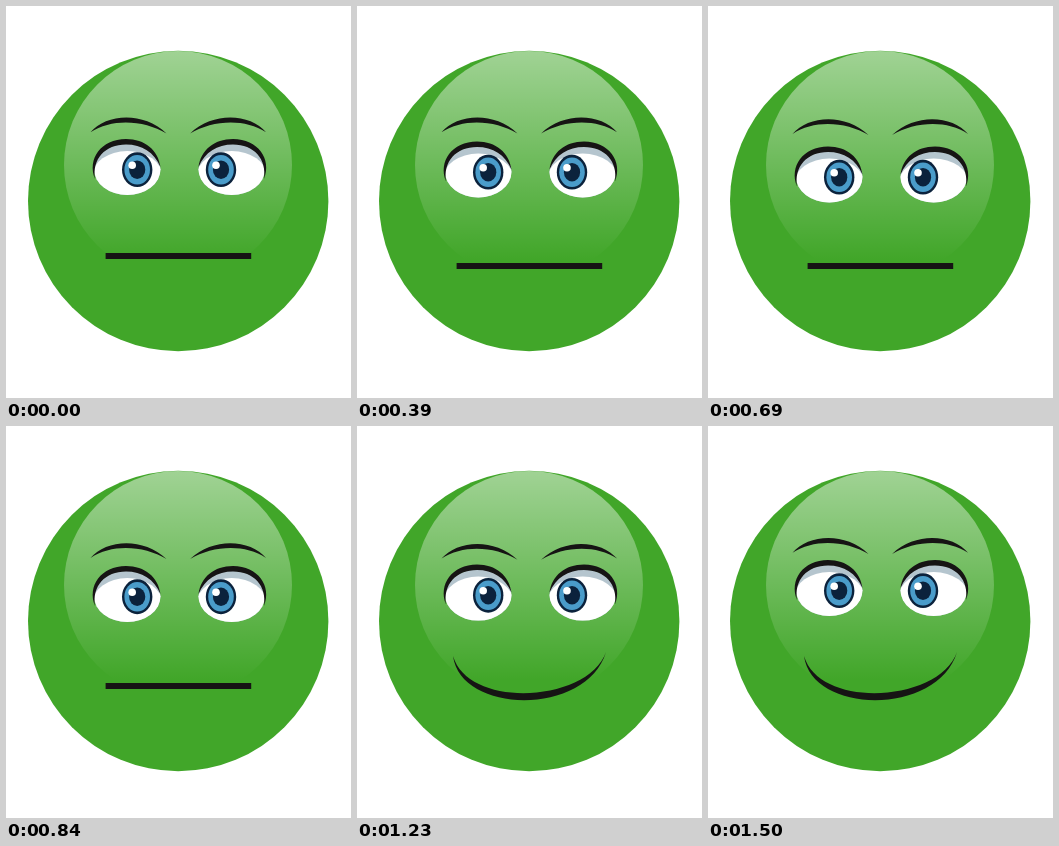
These frames come from a looping animation (345 px wide and 392 px high, 1.8 s). An HTML page with a canvas:

```html
<!DOCTYPE html>
<html lang="en">
<head>
<meta charset="utf-8">
<title>Green face</title>
<style>
html, body { margin: 0; width: 100%; height: 100%; overflow: hidden; background: #fff; }
canvas { display: block; width: 345px; height: 392px; }
</style>
</head>
<body>
<canvas id="stage" width="345" height="392"></canvas>
<script>
const ctx = document.getElementById('stage').getContext('2d');
const LOOP = 1800, STEP = 30, LAST = 1500;
const INK = '#161414', NAVY = '#0b223c';

// Vertical offsets as [time, px] keys
const tracks = {
  mouth: [[30, 0], [270, 9.6], [330, 10]],
  eyes: [[240, 0], [690, 7.5], [930, 6.8], [1170, 6.6], [1500, 1]],
  brows: [[630, 0], [930, 8], [1170, 7.6], [1500, 0.5]],
  smile: [[930, -2.8], [1200, 0]]
};
const SMILE_AT = 930;

function valueAt(keys, t) {
  if (t <= keys[0][0]) return keys[0][1];
  for (let i = 1; i < keys.length; i++) {
    const [t0, v0] = keys[i - 1], [t1, v1] = keys[i];
    if (t <= t1) return v0 + (v1 - v0) * (t - t0) / (t1 - t0);
  }
  return keys[keys.length - 1][1];
}

function ellipse(x, y, rx, ry, fill) {
  ctx.beginPath();
  ctx.ellipse(x, y, rx, ry, 0, 0, Math.PI * 2);
  ctx.fillStyle = fill;
  ctx.fill();
}

function shape(path, fill) {
  ctx.fillStyle = fill;
  ctx.fill(path);
}

function shifted(dy, draw) {
  ctx.save();
  ctx.translate(0, dy);
  draw();
  ctx.restore();
}

// Draws once as is and once mirrored about the vertical line x = axis
function bothSides(axis, draw) {
  draw();
  ctx.save();
  ctx.translate(axis * 2, 0);
  ctx.scale(-1, 1);
  draw();
  ctx.restore();
}

const brow = new Path2D('M84.5 126.3C100 108 137 105 160.5 127.5C138 114 106 112 84.5 126.3Z');
const lid = new Path2D('M89 173C81 153 95 133 120 133C139 133 152 144 154.5 161C148 146 136 138.5 120 138.5C99 138.5 86 153 89 173Z');
const smile = new Path2D('M96 230C104 289 230 290 249 226C232 276 112 284 96 230Z');

const shine = ctx.createLinearGradient(0, 45, 0, 254);
shine.addColorStop(0, 'rgba(255,255,255,0.5)');
shine.addColorStop(1, 'rgba(255,255,255,0)');

function drawEyeball() {
  ellipse(121.3, 163.3, 33.2, 25.7, '#b5c5ce');
  ctx.save();
  ctx.beginPath();
  ctx.ellipse(121.3, 163.3, 33.2, 25.7, 0, 0, Math.PI * 2);
  ctx.clip();
  ellipse(121.3, 170, 35, 25, '#fff');
  ctx.restore();
}

function drawIris(x) {
  ellipse(x, 163.7, 15.2, 17.4, NAVY);
  ellipse(x, 163.7, 12.8, 14.8, '#4a9cca');
  ellipse(x, 163.7, 8.1, 9.3, NAVY);
  ellipse(x - 5, 159.2, 3.8, 3.8, '#fff');
}

function drawEyes() {
  bothSides(173.5, drawEyeball);
  drawIris(131.2);
  drawIris(215);
  bothSides(173.5, () => shape(lid, INK));
}

function render(t) {
  ctx.fillStyle = '#fff';
  ctx.fillRect(0, 0, 345, 392);
  ellipse(172.2, 195, 150.2, 150.2, '#41a629');
  ellipse(172, 159, 114, 114, shine);

  shifted(valueAt(tracks.brows, t), () => bothSides(172.3, () => shape(brow, INK)));
  shifted(valueAt(tracks.eyes, t), drawEyes);
  if (t < SMILE_AT) {
    ctx.fillStyle = INK;
    ctx.fillRect(99.6, 247 + valueAt(tracks.mouth, t), 145.6, 6);
  } else {
    shifted(valueAt(tracks.smile, t), () => shape(smile, INK));
  }
}

const start = performance.now();
function tick() {
  const t = (performance.now() - start) % LOOP;
  render(Math.min(Math.floor(t / STEP) * STEP, LAST));
  requestAnimationFrame(tick);
}
tick();
</script>
</body>
</html>
```
